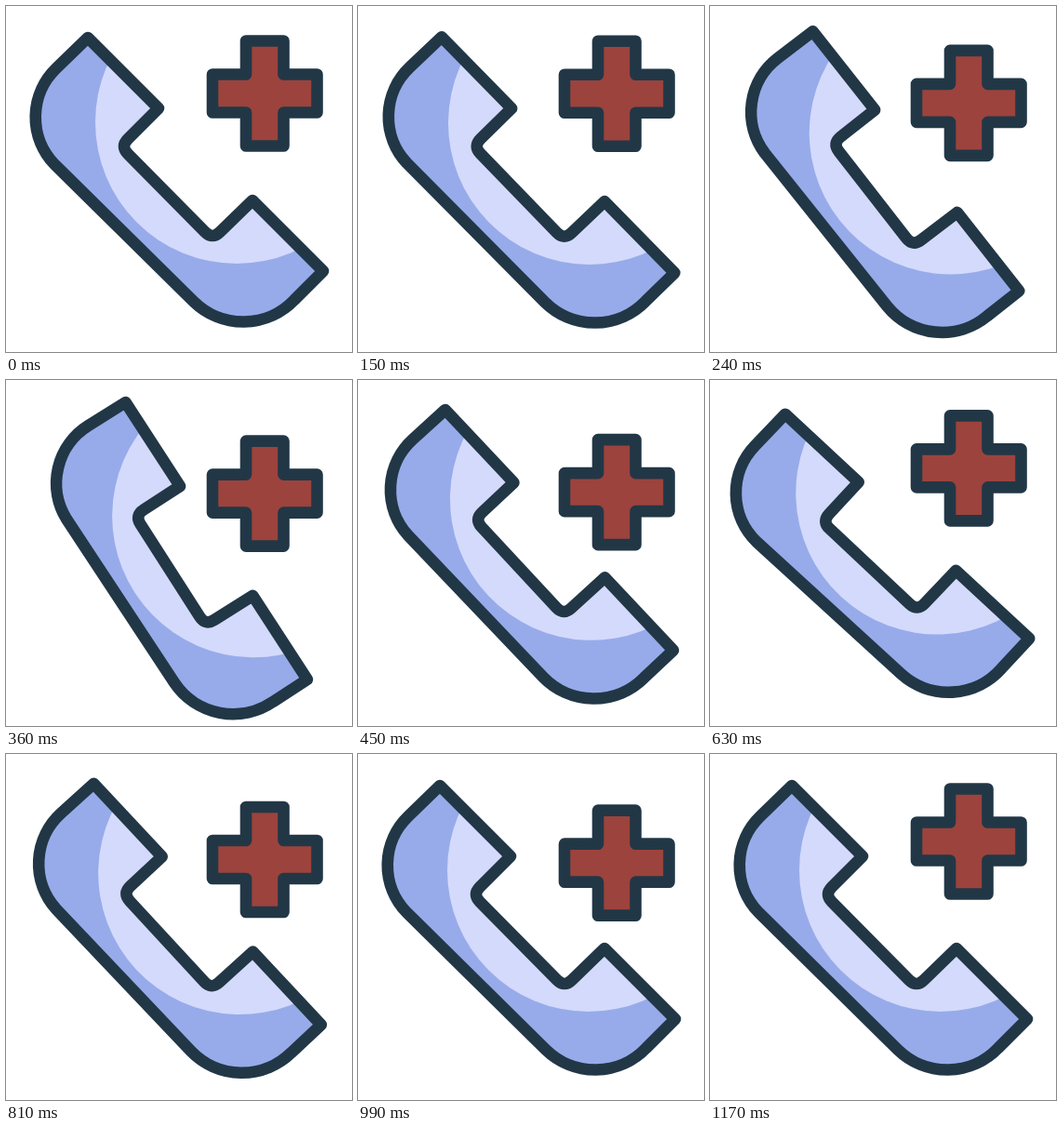
An HTML page that plays this animation: 372x372 px, repeating every 1500 ms.

```html
<!DOCTYPE html>
<html lang="en">
<head>
<meta charset="utf-8">
<title>Emergency call</title>
<style>
  html, body { margin: 0; height: 100%; overflow: hidden; background: #fff; }
  svg { display: block; width: 100%; height: 100%; }
  .line { stroke: #223746; stroke-width: 12.6; stroke-linejoin: round; }
</style>
</head>
<body>
<svg viewBox="0 0 372 372">
  <defs>
    <path id="shape" d="M88 34L164 110L131 143Q123 151 131 159L214 243Q222 251 230 243L265 209L341 285L310 316A76 76 0 0 1 202 318L52 170A73 73 0 0 1 54 67Z"/>
    <clipPath id="inside"><use href="#shape"/></clipPath>
  </defs>
  <g id="phone">
    <use href="#shape" fill="#97abea"/>
    <circle cx="248" cy="125" r="152" fill="#d4dafb" clip-path="url(#inside)"/>
    <use href="#shape" class="line" fill="none"/>
  </g>
  <path id="cross" class="line" fill="#9c433d" d="M258 37.5H298.5V73.5H334.5V114.5H298.5V150.5H258V114.5H222V73.5H258Z"/>
</svg>
<script>
  const LOOP = 1500, STEP = 30, START = 150, END = 1170;
  const phone = document.getElementById('phone');
  const cross = document.getElementById('cross');

  // Keys are [time in ms, value]
  const swing = [[120, 0], [345, 12.3], [540, -6.6], [735, 3.4], [898, 0]];
  const bob = [[136, 0], [398, 29.8], [656, 0], [911, 29.8], [1170, 0]];

  // Smooth ease from each key to the next
  function valueAt(keys, t) {
    const i = keys.findIndex(key => key[0] > t);
    if (i < 1) return 0;
    const [t0, a] = keys[i - 1], [t1, b] = keys[i];
    const p = (t - t0) / (t1 - t0);
    return a + (b - a) * p * p * (3 - 2 * p);
  }

  function draw() {
    const t = Math.floor(performance.now() % LOOP / STEP) * STEP;
    const moving = t >= START && t < END;
    const angle = moving ? valueAt(swing, t) : 0;
    const drop = moving ? valueAt(bob, t) : 0;
    phone.setAttribute('transform', `rotate(${angle} 156 222)`);
    cross.setAttribute('transform', `translate(0 ${drop})`);
    requestAnimationFrame(draw);
  }
  draw();
</script>
</body>
</html>
```
